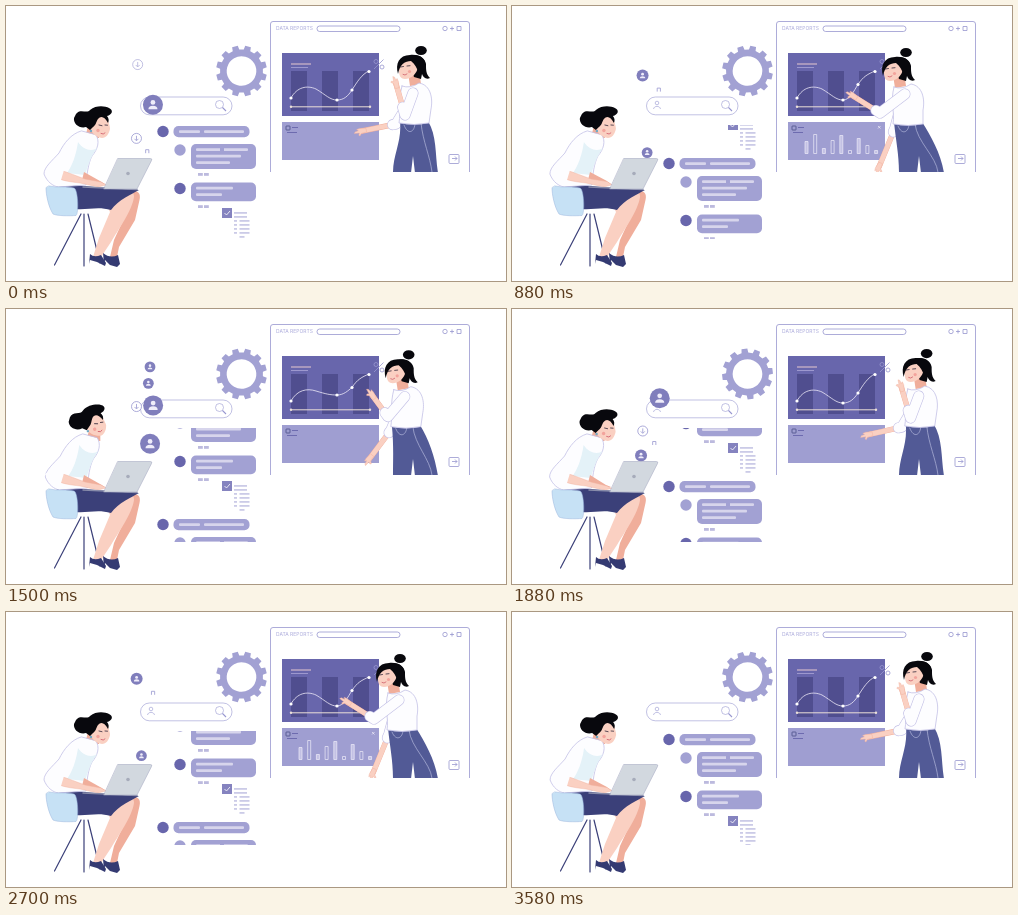
Write an HTML page with a canvas that moves like this. It is 500x275 px and loops after 3.6 s.

```html
<!DOCTYPE html>
<html lang="en">
<head>
<meta charset="utf-8">
<title>Team dashboard</title>
<style>
html, body { margin: 0; width: 100%; height: 100%; overflow: hidden; background: #fff; }
canvas { display: block; width: 500px; height: 275px; }
</style>
</head>
<body>
<canvas id="stage"></canvas>
<script>
const LOOP = 3600, HALF = 1800, ROWS = 120;
const DARK = '#6866ac', MID = '#a2a1d3', LINE = '#9897d0', PALE = '#d7d5ec';
const NAVY = '#3b4079', SKIN = '#fad0c2', SHADE = '#f0ae9b', HAIR = '#08080d';
const SHIRT = '#fdfdff', EDGE = '#c3c0e6', DENIM = '#525a96';

const canvas = document.getElementById('stage');
const c = canvas.getContext('2d');
const dpr = window.devicePixelRatio || 1;
canvas.width = 500 * dpr;
canvas.height = 275 * dpr;

function paint(fill, stroke, w, path) {
  if (fill) { c.fillStyle = fill; c.fill(path); }
  if (stroke) { c.strokeStyle = stroke; c.lineWidth = w; c.stroke(path); }
}
const shape = (d, fill, stroke, w = 0.8) => paint(fill, stroke, w, new Path2D(d));
function pill(x, y, w, h, r, fill, stroke, lw = 0.8) {
  const p = new Path2D();
  p.roundRect(x, y, w, h, r);
  paint(fill, stroke, lw, p);
}
function oval(x, y, rx, ry, fill, stroke, lw = 0.8) {
  const p = new Path2D();
  p.ellipse(x, y, rx, ry, 0, 0, 7);
  paint(fill, stroke, lw, p);
}
const dot = (x, y, r, ...style) => oval(x, y, r, r, ...style);
function rect(x, y, w, h, fill) {
  c.fillStyle = fill;
  c.fillRect(x, y, w, h);
}
function limb(points, color, w) {
  c.beginPath();
  points.forEach(p => c.lineTo(...p));
  c.strokeStyle = color;
  c.lineWidth = w;
  c.stroke();
}

const mix = (a, b, k) => a.map((v, i) => v + (b[i] - v) * k);
function ease(a, b, t) {
  const k = Math.min(1, Math.max(0, (t - a) / (b - a)));
  return k * k * (3 - 2 * k);
}
// Rises from a to b, falls from d to e
const hold = (t, a, b, d, e) => ease(a, b, t) - ease(d, e, t);

function gear(t) {
  const teeth = 12, step = Math.PI * 2 / teeth;
  c.save();
  c.translate(235.5, 65);
  c.rotate(t / LOOP * Math.PI * 2 + step / 2);
  c.beginPath();
  for (let i = 0; i < teeth; i++) {
    for (const [side, r] of [[-.3, 21.5], [-.22, 25.5], [.22, 25.5], [.3, 21.5]]) {
      const a = (i + side) * step;
      c.lineTo(Math.cos(a) * r, Math.sin(a) * r);
    }
  }
  c.closePath();
  c.moveTo(14.8, 0);
  c.arc(0, 0, 14.8, 0, Math.PI * 2, true);
  c.fillStyle = MID;
  c.fill();
  c.restore();
}

function message(y, h, color, widths) {
  dot(174, y + 6, 5.7, color);
  pill(185, y, 65, h, 5, MID);
  widths.forEach((w, i) => pill(190, y + 4.3 + i * 6.5, w, 2.8, 1, PALE));
  [192, 198].forEach(x => rect(x, y + h + 4, 4.8, 2.8, '#bcbade'));
}
function chatBlock() {
  dot(157, 125.5, 5.7, DARK);
  pill(167.5, 120, 76, 11.2, 5, MID);
  pill(173, 124.2, 21, 2.8, 1, PALE);
  pill(198, 124.2, 40, 2.8, 1, PALE);
  message(138, 25, MID, [52, 45, 34]);
  rect(214, 142, 4, 3.4, MID);
  message(176.5, 18.7, DARK, [37, 26]);
  rect(216, 202, 10, 10, '#8583bf');
  shape('M218.5 207l2 2 3.5-4', null, '#fff');
  for (let i = 0; i < 7; i++) {
    const y = 206.5 + i * 4;
    if (i < 6) rect(228, y, 3, 0.9, LINE);
    rect(i < 2 ? 231 : 233.5, y, i < 6 ? 10 : 5, 0.9, LINE);
  }
}
function chat(t) {
  c.save();
  c.beginPath();
  c.rect(148, 119, 106, 114);
  c.clip();
  c.translate(0, -(t / 10) % ROWS);
  chatBlock();
  c.translate(0, ROWS);
  chatBlock();
  c.restore();
}

function user(x, y, s, fill) {
  dot(x, y - s * 0.25, s * 0.25, fill);
  shape(`M${x - s * .48} ${y + s * .48}a${s * .48} ${s * .38} 0 0 1 ${s * .96} 0z`, fill);
}
function searchBar() {
  pill(134.5, 91, 91.5, 17.8, 8.9, '#fff', LINE, 0.6);
  dot(145, 97, 1.8, null, LINE, 0.6);
  shape('M141.5 103C142 99.5 148 99.5 148.5 103', null, LINE, 0.6);
  dot(213.5, 98.5, 4, null, LINE, 0.6);
  shape('M216.5 101.5l3.5 3.5', null, LINE, 1.1);
}

// Badges rise from behind the laptop: radius, speed in px/ms, sideways drift, top
const kinds = {
  ring: { r: 5, v: .13, drift: .03, top: 54 },
  tiny: { r: 2, v: .14, drift: .09, top: 74 },
  user: { r: 6, v: .14, drift: .02, top: 54 },
  mate: { r: 5.4, v: .143, drift: .1, top: 52 },
  lead: { r: 10, v: .12, drift: .08, top: 74 }
};
const badges = [
  ['ring', 130, -120], ['tiny', 141, -20], ['user', 129, 70], ['user', 129, 320], ['tiny', 141, 420],
  ['mate', 135, 870], ['mate', 135, 985], ['lead', 143, 1070], ['ring', 129, 1112], ['lead', 143, 1390]
];
function drawBadge([name, x0, start], t) {
  const { r, v, drift, top } = kinds[name];
  const rise = ((t - start) % HALF + HALF) % HALF * v;
  const x = x0 + rise * drift, y = 148 - rise;
  if (y < top) return;
  c.globalAlpha = Math.min(1, (y - top) / 6);
  if (name === 'tiny') {
    shape(`M${x - 1.6} ${y + 2}v-3.5h3.2v3.5`, null, LINE);
  } else if (name === 'ring') {
    dot(x, y, r, '#fff', LINE);
    shape(`M${x} ${y - 2.6}v4.5m-2-1.5l2 2 2-2`, null, LINE);
  } else {
    dot(x, y, r, '#807ebc');
    user(x, y, r * 0.95, '#efedfa');
  }
  c.globalAlpha = 1;
}

function board(u) {
  shape('M264.5 166V18q0-2.500 2.500-2.500h194q2.500 0 2.500 2.500V166', '#fff', LINE);
  c.font = '5px Inter, sans-serif';
  c.fillStyle = '#a9a8da';
  c.fillText('DATA REPORTS', 270, 24);
  pill(311, 20, 83, 5.5, 2.7, null, LINE);
  dot(439, 22.5, 2.2, null, LINE);
  shape('M444 22.500h4m-2-2v4M451 20.500h4v4h-4z', null, LINE);
  pill(443, 148.5, 10, 9, 1, null, LINE);
  shape('M446 152.500h5m-2-2l2 2-2 2', null, LINE);

  rect(276, 47, 97, 63, DARK);
  [285, 316, 347].forEach(x => rect(x, 65, 16, 40, '#504e8f'));
  rect(285, 57.5, 20, 1, '#e6c7cf');
  rect(285, 61, 17, 0.8, '#aaa6d8');
  rect(285, 100.3, 79, 1, '#eadfd8');
  [285, 364].forEach(x => dot(x, 100.8, 1.2, '#eadfd8'));

  // the presenter drags two points of the curve
  const flat = hold(u, 900, 1250, 1530, 1720);
  const y2 = 94 - 8 * flat;
  const y3 = 84 - 5.5 * hold(u, 480, 760, 1530, 1720);
  shape(`M285 92C291 81 301 79 310 ${83 - flat}C320 ${89 - flat * 4} 324 ${y2} 331 ${y2}
    C338 ${y2} 342 ${y3 + 6 - flat * 3} 346 ${y3}C351 ${y3 - 8} 356 68 363 65`, null, '#eeeaf8');
  [[285, 92], [331, y2], [346, y3], [363, 65.5]].forEach(p => dot(...p, 1.6, '#fff'));

  dot(370, 55.5, 2, null, LINE);
  dot(376, 61, 2, null, LINE);
  shape('M377.5 53.500L368 63', null, LINE);

  rect(276, 116, 97, 38, '#9f9ed1');
  pill(280, 120, 4, 4, 0.5, null, NAVY, 0.7);
  rect(286, 121, 6, 0.9, DARK);
  rect(281, 126, 10, 0.9, DARK);
  const grow = hold(u, 100, 300, 1020, 1200);
  if (grow < 0.01) return;
  [12, 19, 5, 13, 18, 3, 15, 8, 3].forEach((size, i) => {
    const h = size * grow, x = 293 + i * 8.7;
    pill(x, 147.5 - h, 3, h, 0, i % 2 ? null : '#c3c1e4', '#efedfa', 0.7);
  });
  shape('M366 120l2.500 2.500m0-2.500l-2.500 2.500', null, '#f2f0fb', 0.7);
}

// Joints: head, waist, shoulder, front elbow and hand, back elbow and hand
const idle = [[406, 60], [394, 115], [405, 87], [399, 109], [390, 78], [390, 118], [356, 125]];
const pointing = [[388, 62], [382, 116], [393, 88], [374, 107], [355, 90], [383, 122], [367, 161]];

function palm(from, at) {
  c.save();
  c.translate(...at);
  c.rotate(Math.atan2(at[1] - from[1], at[0] - from[0]));
  shape('M-4-2L1-2.200 3-4.500 4-3.500 3-1.500 8-1 7 .5 3.500 1 5 2.500 2 3-4 2Z', SKIN, SHADE, 0.4);
  c.restore();
}
function arm(shoulder, elbow, hand, bare) {
  limb([elbow, hand], SHADE, 5.4);
  limb([elbow, hand], SKIN, 4.8);
  palm(elbow, hand);
  const cuff = mix(elbow, hand, bare);
  limb([shoulder, elbow, cuff], EDGE, 11);
  limb([shoulder, elbow, cuff], SHIRT, 9.8);
}

function presenter(u) {
  const lean = hold(u, 60, 300, 1380, 1700);
  const reach = hold(u, 480, 880, 1280, 1400);
  const [head, [wx, wy], sh, elbow, hand, elbow2, hand2] = idle.map((p, i) => mix(p, pointing[i], lean));
  const shift = (p, k) => { p[0] -= k * reach; };
  shift(head, 3); shift(sh, 2); shift(elbow, 6); shift(hand, 14);
  const [sx, sy] = sh;

  c.save();
  c.beginPath();
  c.rect(300, 16, 163, 150);
  c.clip();
  c.lineJoin = c.lineCap = 'round';
  arm([sx - 1, sy + 8], elbow2, hand2, 0.1);

  // trousers
  shape(`M${wx} ${wy}H${wx + 28}C${wx + 37} 130 429 148 432 167H409L407 150 405 167H387C387 148 ${wx + 2} 136 ${wx} ${wy}Z`, DENIM);
  shape(`M${wx + 21} ${wy + 2}C${wx + 23} 136 424 150 426 166M${wx + 4} ${wy + 4}C${wx + 8} 130 ${wx + 15} 126 ${wx + 15} ${wy + 2}`,
    null, '#b4b8dc', 0.7);

  // neck and shirt
  c.save();
  c.translate(...head);
  shape('M-4 7L7 4 9 18-2 20Z', SHADE);
  c.restore();
  shape(`M${sx - 9} ${sy - 7}Q${sx - 1} ${sy - 4} ${sx + 8} ${sy - 10}C${sx + 20} ${sy - 8} ${sx + 22} ${sy + 6} ${sx + 20} ${sy + 16}
    L${wx + 29} ${wy + 2}Q${wx + 14} ${wy + 5} ${wx - 1} ${wy + 2}C${wx + 1} ${sy + 18} ${sx - 13} ${sy + 8} ${sx - 9} ${sy - 7}Z`, SHIRT, EDGE);

  // head
  c.save();
  c.translate(...head);
  shape('M-4-9C4-14 13-9 14-2 14 4 14 8 18 12 14 14 11 11 10 8L9 13 2 11-2 0Z', HAIR);
  shape('M-11-6C-13 0-15 4-13 5-13 10-11 13-7 13-1 13 5 8 6 1L3-7Z', SKIN);
  shape('M-14 8C-17-2-13-11-2-11 8-12 15-7 13 2 10 7 8 8 6 6 5 2 3-2-1-5-7-5-12-2-14 8Z', HAIR);
  oval(9, -15.5, 5.8, 4.6, HAIR);
  shape('M-11.500 1l3-.5M-5 0l3-.3', null, '#33293a');
  shape('M-9 8.500q2 1.500 4-.5', null, '#d0606c');
  dot(-2.5, 5.5, 1.6, '#f3a39c');
  c.restore();

  arm([sx + 2, sy], elbow, hand, 0.15 + 0.1 * (1 - lean));
  c.restore();
}

function worker(t) {
  const u = t % HALF;
  const up = hold(u, 1370, 1460, 1600, 1720);
  const sway = Math.sin(u / HALF * Math.PI * 2) * -1.5;
  const tap = Math.sin(t / 300 * Math.PI * 2);
  c.lineCap = c.lineJoin = 'round';

  shape('M75 208L48.500 259M78 208V260M82 208L94 257', null, NAVY, 1.2);

  // legs, shoes, skirt
  shape('M118 186C128 182 136 185 133.500 194L129 214 113 241 111 251H104L108 234 120 208Z', SHADE);
  shape('M98 194C112 182 129 182 128 191 126 205 112 224 105 236L95 251H87L93 232 104 206Z', SKIN);
  shape('M84 248Q88 252 95 249L100 257 99 260 91 256 84 254 83 258Z', '#343a72');
  shape('M97 247Q104 253 112 249L114 258 111 261 104 259 99 254 98 258Z', '#343a72');
  shape('M48 177L100 182 133 184C126 188 112 194 105 204 92 200 82 204 70 203Z', NAVY);

  // torso
  c.save();
  c.translate(sway, 0);
  shape('M82 120L93 123 93 132 79 132Z', SHADE);
  shape('M75 125C65 128 58 137 53 147 46 155 38 161 38 168 41 176 47 180 52 181L80 179C81 168 82 158 86 150 92 143 94 135 90 129Z',
    SHIRT, EDGE);
  shape('M72 136C70 150 66 160 61 167L79 169C82 160 84 152 91 142 86 146 77 144 72 136Z', '#e4f2f8');

  // head
  c.translate(86 - up * 5, 122 - up * 3);
  c.rotate(-0.2 * up);
  shape('M-2-10L15-12C17-5 18-1 18 1 17 6 14 10 10 10 4 9-1 5-2-1Z', SKIN);
  shape('M-16-14C-12-20-5-14-2-18 4-23 13-22 17-20 22-18 20-13 15-12 17-10 17-7 16-5 13-11 9-13 6-9 4-6 4-3 1-1L-2 2-6-1C-12 1-19-4-18-10Z', HAIR);
  dot(-1, 3, 1.2, '#6fa8c4');
  shape('M7-3l3 .7M13-3l2.500 .2', null, '#33293a');
  shape('M9 5.500q2.500 1.500 4-.5', null, '#cf5767');
  dot(6, 2.5, 1.7, '#f3a39c');
  c.restore();

  shape('M43 180C51 182 61 180 68 182 72 183 73 207 70 209.500 63 210 51 210 47 208 42 200 40 188 40 182Z', '#c6e1f5', '#9bb5dc', 0.5);

  // arms
  shape(`M78 166L94 ${175 + tap} 99 178 92 180 76 174Z`, SHADE);
  shape(`M53 164C62 166 70 170 79 173L95 ${176 + tap} 100 ${179 + tap * 0.5} 92 181 74 177C66 176 56 175 52 172Z`, SKIN, SHADE, 0.4);
  shape('M39 165C45 160 54 158 58 164L55 174C48 175 42 173 39 165Z', SHIRT);

  // laptop
  shape('M77 181L131 183.500', null, '#878baa', 1.4);
  shape('M112 152.500H144.500Q146.500 152.500 145.500 154.500L131 183H98Z', '#d2d8df', '#a9adc4', 0.6);
  dot(122, 167.5, 1.8, '#a6abba');
}

function draw(t) {
  const u = t % HALF;
  c.setTransform(dpr, 0, 0, dpr, 0, 0);
  rect(0, 0, 500, 275, '#fff');
  c.lineCap = 'butt';
  gear(t);
  chat(t);
  searchBar();
  if (t < 3540) badges.forEach(b => drawBadge(b, t));
  board(u);
  presenter(u);
  worker(t);
}

let begin;
function frame(now) {
  begin ??= now;
  draw((now - begin) % LOOP);
  requestAnimationFrame(frame);
}
draw(0);
requestAnimationFrame(frame);
</script>
</body>
</html>
```
